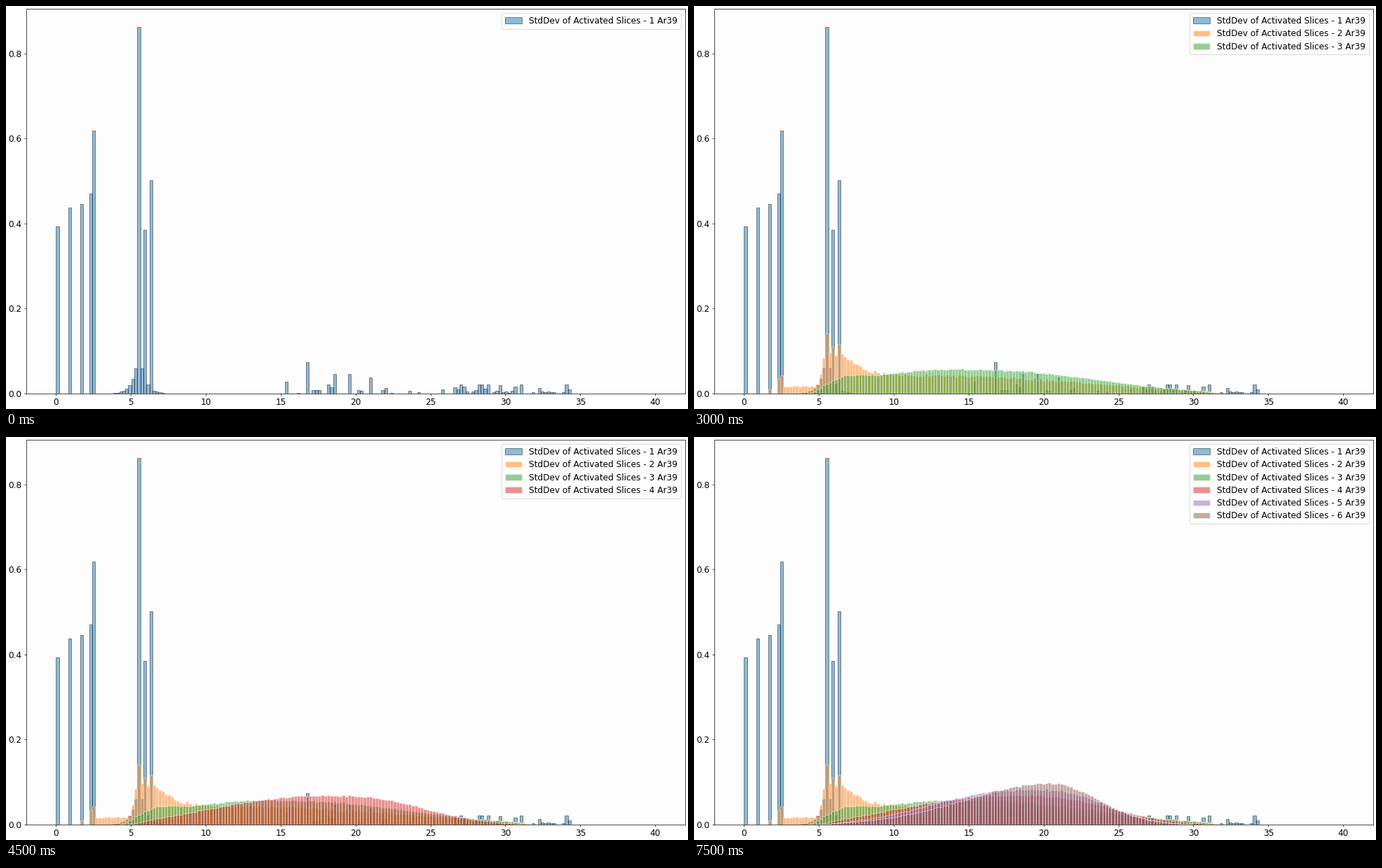
Animation, 973 px wide and 576 px high, one loop 8000 ms. Source, as a matplotlib script:

```python
import numpy as np
import matplotlib.pyplot as plt
from matplotlib.animation import FuncAnimation

W, H, DPI = 973, 576, 62.5
LEFT, RIGHT, TOP, BOTTOM = 28.6, 968.9, 4, 554
STEP_MS, STEPS_PER_SERIES, SERIES = 500, 3, 6

plt.rcParams.update({"font.family": "DejaVu Sans", "font.size": 14})

edges = np.linspace(0, 40, 200)
width = edges[1]
x = edges[:-1] + width / 2
rng = np.random.default_rng(39)


def rise(at, scale):
    """Smooth step from 0 to 1 around x = at."""
    return 1 / (1 + np.exp(-np.clip((x - at) / scale, -50, 50)))


def hump(height, peak, left, right, power):
    """Bell with its own width on each side; power > 2 flattens the top."""
    spread = np.where(x < peak, left, right)
    return height * np.exp(-0.5 * (np.abs(x - peak) / spread) ** power)


def sampled(heights, noise):
    """Cut off the far tail and add sampling noise."""
    heights = heights * (1 - rise(31.3, 0.3))
    return heights * (1 + noise * rng.uniform(-1, 1, len(x)))


def one_decay():
    out = 0.1 * np.exp(-np.abs(x - 5.53) / 0.38)
    chance = 0.27 + 0.6 * np.exp(-((x - 29.5) / 2.5) ** 2)
    tail = (x > 13.3) & (x < 35.2) & (rng.random(len(x)) < chance)
    small = 0.002 + rng.exponential(0.008, len(x))
    out[tail] = np.minimum(small, 0.022)[tail]
    peaks = {0: 0.393, 4: 0.437, 8: 0.446, 11: 0.471, 12: 0.619, 27: 0.862,
             29: 0.385, 31: 0.502, 76: 0.028, 83: 0.074, 92: 0.046,
             97: 0.046, 104: 0.038}
    for i, h in peaks.items():
        out[i] = h
    return out


def two_decays(first):
    decay = 0.055 * np.exp((6.6 - x) / 1.1)
    body = np.minimum(hump(0.043, 10, 30, 12.5, 2.5) + decay, 0.09)
    body *= rise(5.2, 0.08)
    floor = 0.017 * ((x > 2.2) & (x < 5.2))
    echo = 0.06 * first * np.clip(x / 2.4 - 0.35, 0, 1) * (x < 7)
    return sampled(body + floor, 0.07) + echo


def three_decays():
    shoulder = 0.016 * np.exp(-0.5 * ((x - 6.9) / 1.1) ** 2)
    body = hump(0.057, 14, 6, 9.2, 2.5) + shoulder
    return sampled(body * rise(4.9, 0.25), 0.03)


def late(*shape):
    return sampled(hump(*shape) * rise(5.6, 0.4), 0.025)


first = one_decay()
data = [
    first,
    two_decays(first),
    three_decays(),
    late(0.068, 18.5, 7.6, 5.7, 2.5),
    late(0.082, 19.5, 6.7, 4.4, 2.5),
    late(0.097, 20.5, 5.7, 3.1, 2),
]

fig = plt.figure(figsize=(W / DPI, H / DPI), dpi=DPI, facecolor="white")
ax = fig.add_axes([LEFT / W, 1 - BOTTOM / H,
                   (RIGHT - LEFT) / W, (BOTTOM - TOP) / H])
ax.set_facecolor("#fdfdfd")

groups = []
for n, heights in enumerate(data):
    keep = heights > 0.001
    groups.append(ax.bar(x[keep], heights[keep], width,
                         color=f"C{n}", alpha=0.5, linewidth=1,
                         edgecolor="white" if n else "black",
                         label=f"StdDev of Activated Slices - {n + 1} Ar39"))

ax.set_xlim(-2, 42)
ax.set_ylim(0, first.max() * 1.05)
ax.set_xticks(np.arange(0, 41, 5))
ax.set_yticks(np.arange(0, 0.9, 0.2))


def draw(frame):
    count = 1 + frame // STEPS_PER_SERIES
    for n, group in enumerate(groups):
        for bar in group:
            bar.set_visible(n < count)
    ax.legend(handles=groups[:count], loc="upper right", labelspacing=0.435)
    return []


anim = FuncAnimation(fig, draw, frames=16, interval=STEP_MS,
                     repeat=True, repeat_delay=0, blit=False)
plt.show()
```
